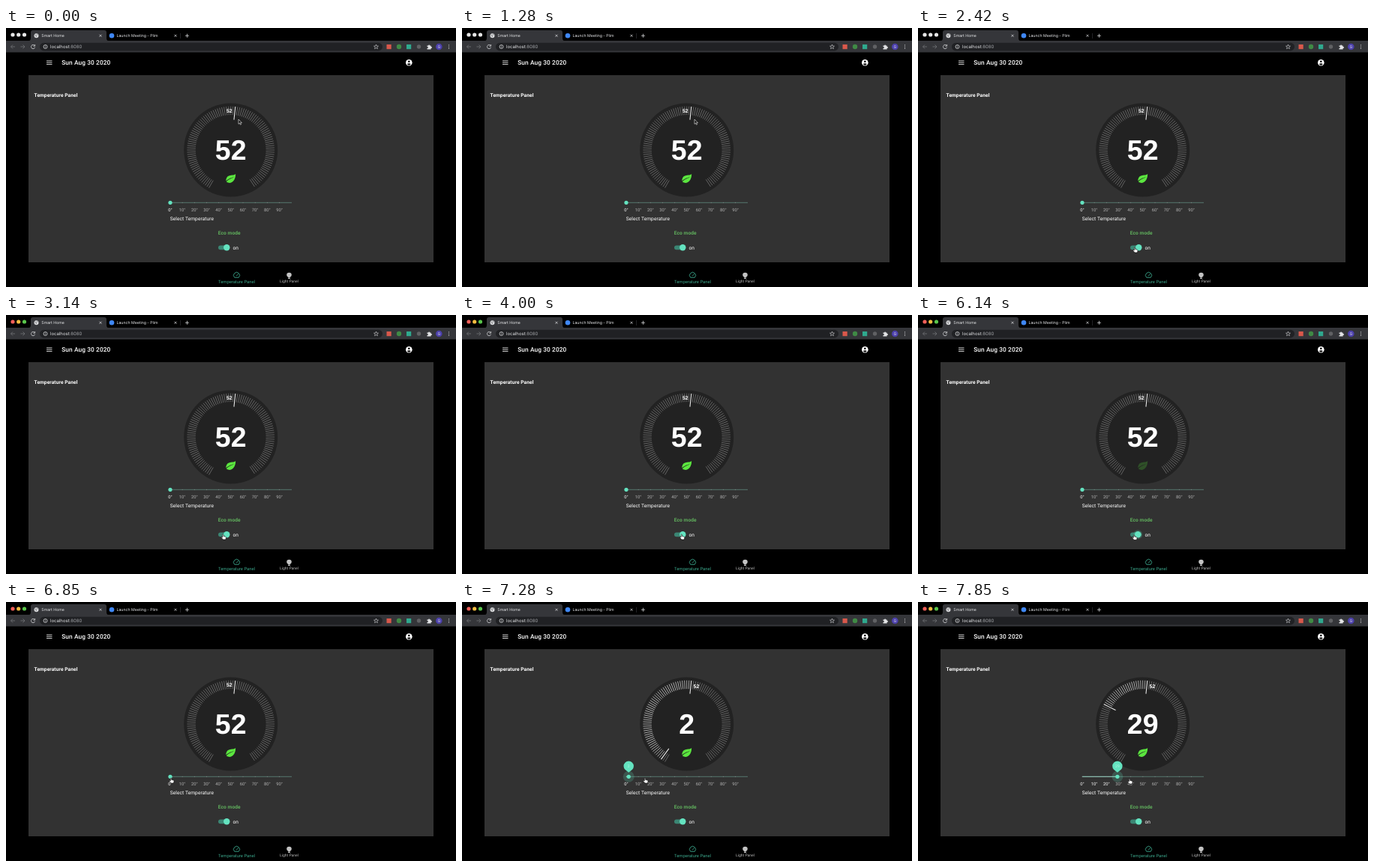
An HTML page that plays this animation: 600 by 346 pixels, repeating every 8000 ms.

```html
<!DOCTYPE html>
<html lang="en">
<head>
<meta charset="utf-8">
<title>Smart Home</title>
<style>
html, body { margin: 0; width: 100%; height: 100%; overflow: hidden; background: #000; }
svg { display: block; width: 100vw; height: 100vh; }
text { font-family: Roboto, sans-serif; fill: #fff; text-rendering: geometricPrecision; }
.ui { font-family: Inter, sans-serif; fill: #e8e9eb; }
.dial { font-family: "Liberation Sans", Arial, sans-serif; font-weight: 700; }
.line { fill: none; stroke: #d5d6d8; stroke-width: .8; }
.wide { letter-spacing: .06px; font-size: 6.67px; }
</style>
</head>
<body>
<svg id="stage" viewBox="0 0 600 346">
  <!-- browser window -->
  <path d="M29 17.5q4 0 4-4V6q0-3 3-3h95q3 0 3 3v7.500q0 4 4 4z" fill="#35363a"/>
  <rect y="17" width="600" height="15.500" fill="#35363a"/>
  <g id="lights"><circle cx="9" cy="9" r="2.600"/><circle cx="16.700" cy="9" r="2.600"/><circle cx="24.500" cy="9" r="2.600"/></g>
  <circle cx="40.500" cy="10.300" r="3" fill="#d9dadc"/>
  <path d="M38.500 9l2 1-.5 2M41 8l1.500 1.500" stroke="#55565a" stroke-width=".7" fill="none"/>
  <text class="ui" x="47.300" y="12.200" font-size="5.200">Smart Home</text>
  <circle cx="141" cy="10.300" r="3.300" fill="#3f87f5"/>
  <text class="ui" x="147.500" y="12.200" font-size="5.200">Launch Meeting - Plim</text>
  <path class="line" d="M124.500 8.800l3 3m0-3l-3 3M224.500 8.800l3 3m0-3l-3 3M239 10.300h5m-2.500-2.500v5"/>
  <path d="M232.500 7v7" stroke="#44454a" stroke-width=".5"/>
  <rect x="45" y="19.800" width="457" height="10.600" rx="5.300" fill="#202124"/>
  <path class="line" d="M38 23.300a2.600 2.600 0 1 0 .6 2.500M38.600 22v2.200h-2.200"/>
  <path class="line" style="stroke:#737478" d="M12 25H6.500m2.500-2.500L6.500 25 9 27.500M19.500 25H25m-2.500-2.500L25 25l-2.500 2.500"/>
  <circle class="line" cx="52.500" cy="25" r="2.500" stroke-width=".6"/>
  <path class="line" d="M52.500 24.700v1.700m0-3.100v.7"/>
  <text class="ui" x="59" y="27.100" font-size="6">localhost<tspan fill="#a5a7ab">:8080</tspan></text>
  <path class="line" style="stroke-width:.6" d="M493.500 22l.8 2.100 2.200.1-1.700 1.400.6 2.200-1.900-1.200-1.900 1.200.6-2.200-1.700-1.400 2.200-.1z"/>
  <rect x="507.500" y="22" width="6.200" height="6.200" fill="#d9584b"/>
  <circle cx="524" cy="25" r="3.200" fill="#3f8a45"/>
  <rect x="534" y="22" width="6.200" height="6.200" fill="#2fa98e"/>
  <circle cx="550.500" cy="25" r="2.700" fill="#606164"/>
  <path d="M561.500 23.500h1.600a1 1 0 1 1 2 0h1.500v1.600a1 1 0 1 1 0 1.900v1.400h-5.100v-1.500a1 1 0 1 0 0-1.900z" fill="#e2e3e5"/>
  <circle cx="577.300" cy="25" r="4.300" fill="#4d41ad"/>
  <text class="ui" x="577.300" y="26.900" font-size="5" text-anchor="middle">G</text>
  <path d="M590.500 22.800v.01m0 2.200v.01m0 2.200v.01" stroke="#d5d6d8" stroke-width="1.200" stroke-linecap="round"/>

  <!-- app bar -->
  <path d="M54 43.900h7.500M54 46.200h7.500M54 48.500h7.500" stroke="#fff" stroke-width=".8"/>
  <text x="74.200" y="49.200" font-size="8.330" font-weight="500" letter-spacing=".1">Sun Aug 30 2020</text>
  <circle cx="537.300" cy="46.200" r="4.300" fill="#fff"/>
  <circle cx="537.300" cy="44.700" r="1.300"/>
  <path d="M534.700 48.300q2.600-2.200 5.200 0-2.600 2.700-5.200 0z"/>

  <!-- panel -->
  <rect x="30" y="63" width="540" height="250" fill="#323232"/>
  <text class="wide" x="37.500" y="91.500" font-weight="700">Temperature Panel</text>
  <circle cx="299.700" cy="163" r="62.500" fill="#222"/>
  <g id="ticks" transform="translate(299.700 163)" stroke="#fff"></g>
  <text id="ambient" class="dial" font-size="6.900" text-anchor="middle">52</text>
  <text id="target" class="dial" x="299.700" y="176.300" font-size="37.500" text-anchor="middle"></text>
  <path id="leaf" transform="translate(293.300 194.600) scale(.128)" fill="#5be63f"
    d="M3 84c24 17 51 18 73-6C100 52 100 22 100 4 87 19 63 13 30 23 4 32 0 63 0 76c6-7 18-17 33-23 24-9 34-9 48-20-9 10-20 16-43 24C22 63 8 78 3 84z"/>

  <!-- slider -->
  <path d="M219 233.300h162" stroke="#5d8379" stroke-width=".85"/>
  <path id="fill" stroke="#a5dfcf" stroke-width=".85"/>
  <g id="labels"></g>
  <g id="thumb" fill="#64e3c0">
    <g id="bubble">
      <circle r="7.500" opacity=".2"/>
      <path d="M0-5.500l-4.900-4a6.700 6.700 0 1 1 9.800 0z"/>
      <text id="bubbleValue" y="-12.500" font-size="5" text-anchor="middle" style="fill:#b5f3e1"></text>
    </g>
    <circle r="2.600"/>
  </g>
  <text class="wide" x="218.700" y="256.700">Select Temperature</text>

  <!-- eco switch -->
  <text class="wide" x="282.800" y="275.700" font-weight="700" style="fill:#5fae5c">Eco mode</text>
  <rect id="track" x="283" y="290.400" width="15" height="5.800" rx="2.900"/>
  <circle id="halo" cy="293.300" r="6" fill="#64e3c0"/>
  <circle id="knob" cy="293.300" r="4.200"/>
  <text id="state" class="wide" x="302.500" y="295.500"></text>

  <!-- bottom navigation -->
  <path d="M304.700 333.300a4 4 0 1 1 5.600 0zM307 331.400l2.500-2.800" fill="none" stroke="#3aa489" stroke-width=".9"/>
  <text x="307.500" y="340.500" font-size="5.830" text-anchor="middle" style="fill:#3aa489">Temperature Panel</text>
  <path d="M376 332.700q-1.800-1-1.800-2.700a3.300 3.300 0 0 1 6.600 0q0 1.700-1.800 2.700v.8h-3zM376 334.100h3v1h-3z" fill="#c4c4c4"/>
  <text x="377.500" y="340.400" font-size="5" text-anchor="middle" style="fill:#b8b8b8">Light Panel</text>

  <!-- pointers -->
  <path id="arrow" d="M0 0v6.300l1.500-1.300 1 2.200 1-.4-1-2.200h2z" fill="#111" stroke="#eee" stroke-width=".6"/>
  <path id="hand" d="M-.7.5Q0-.6.7.5V2.500l2.500.6q1 .3.8 1.500L3.500 7H0L-2.300 4.300q-.1-1 .9-.8l.7.6z" fill="#fff" stroke="#000" stroke-width=".6"/>
</svg>
<script>
const LOOP = 8000, STEP = LOOP / 56, AMBIENT = 52, TICKS = 100;
const $ = id => document.getElementById(id);
const set = (node, attrs) => { for (const k in attrs) node.setAttribute(k, attrs[k]); };
const add = (parent, tag, attrs, text = "") => {
  const node = document.createElementNS("http://www.w3.org/2000/svg", tag);
  set(node, attrs);
  node.textContent = text;
  return parent.appendChild(node);
};
const clamp = x => Math.max(0, Math.min(1, x));
const easeOut = x => 1 - (1 - clamp(x)) ** 3;
const smooth = x => x * x * (3 - 2 * x);
const sliderX = value => 219 + 1.617 * value;
const dialAngle = value => value * 3 - 150;

// Rows are [time, ...values].
const POINTER = [[1430, 310, 122], [2290, 289, 293], [3000, 289, 293], [3700, 293, 293],
  [4700, 292, 293], [5200, 289, 293.5], [6280, 288, 293.5], [6860, 220, 235],
  [7000, 222, 235], [7280, 244, 235]];
const DRAG = [[7000, 0], [7286, 2], [7429, 10], [7857, 29]];
const FOCUS = 2850, SWITCH_OFF = 4850, SWITCH_ON = 6000, PRESS = 7000;

function sample(rows, t, ease = x => x) {
  const i = rows.findIndex(row => row[0] > t);
  if (i < 0) return rows[rows.length - 1].slice(1);
  if (i === 0) return rows[0].slice(1);
  const [from, to] = [rows[i - 1], rows[i]];
  const k = ease((t - from[0]) / (to[0] - from[0]));
  return from.slice(1).map((v, j) => v + (to[j + 1] - v) * k);
}

const ticks = Array.from({ length: TICKS }, (_, i) =>
  add($("ticks"), "line", { y1: -58.3, transform: `rotate(${dialAngle(i)})` }));
const labels = Array.from({ length: 10 }, (_, i) => {
  add($("labels"), "rect", { x: sliderX(i * 10) - .4, y: 232.9, width: .8, height: .8, fill: "#999" });
  return add($("labels"), "text", { x: sliderX(i * 10), y: 244.6, "font-size": 5.83, "text-anchor": "middle" }, `${i * 10}°`);
});

function drawDial(target) {
  const low = Math.min(target, AMBIENT), high = Math.max(target, AMBIENT);
  ticks.forEach((tick, i) => {
    const end = i === low || i === high;
    set(tick, {
      y2: end ? -40.6 : -46.9,
      "stroke-width": end ? 1 : .7,
      opacity: end ? .95 : i > low && i < high ? .8 : .38
    });
  });
  const angle = (dialAngle(AMBIENT) + (AMBIENT > target ? 8 : -8)) * Math.PI / 180;
  set($("ambient"), { x: 299.7 + 52.5 * Math.sin(angle), y: 165.5 - 52.5 * Math.cos(angle) });
  $("target").textContent = target;
}

function drawSlider(value, pressed) {
  const x = sliderX(value);
  set($("fill"), { d: `M219 233.300H${x}` });
  set($("thumb"), { transform: `translate(${x} 233.300)` });
  set($("bubble"), { visibility: pressed ? "visible" : "hidden" });
  $("bubbleValue").textContent = value;
  labels.forEach((label, i) => { label.style.fill = i * 10 <= value ? "#fff" : "#b0b0b0"; });
}

function drawSwitch(t) {
  const on = t < SWITCH_OFF || t >= SWITCH_ON;
  const slide = t < SWITCH_ON ? 1 - easeOut((t - SWITCH_OFF) / 300) : easeOut((t - SWITCH_ON) / 300);
  const x = 286.7 + 7.6 * slide;
  set($("track"), { fill: on ? "#3b8674" : "#707070" });
  set($("knob"), { cx: x, fill: on ? "#64e3c0" : "#bdbdbd" });
  const sinceClick = t - (t < SWITCH_ON ? SWITCH_OFF : SWITCH_ON);
  set($("halo"), { cx: x, opacity: sinceClick >= 0 ? .3 * clamp(1 - sinceClick / 600) : 0 });
  $("state").textContent = on ? "on" : "off";
  const leaf = t < SWITCH_ON ? 1 - clamp((t - SWITCH_OFF) / 500) : clamp((t - SWITCH_ON) / 600);
  set($("leaf"), { opacity: leaf });
}

function drawPointer(t) {
  const [x, y] = t < 7286 ? sample(POINTER, t, smooth) : sample([[7286, 244, 235], [7857, 282, 236]], t);
  const hand = t >= 2270 && t < 6420 || t >= 6780;
  for (const id of ["arrow", "hand"]) {
    set($(id), {
      transform: `translate(${x} ${y})`,
      visibility: (id === "hand") === hand ? "visible" : "hidden"
    });
  }
}

function draw(now) {
  const clock = Math.floor(now % LOOP / 10) * 10 + 9.99;
  const t = Math.floor(clock / STEP) * STEP;
  const value = Math.round(sample(DRAG, t)[0]);
  drawDial(value || AMBIENT);
  drawSlider(value, t >= PRESS);
  drawSwitch(t);
  drawPointer(t);
  const colors = t < FOCUS ? ["#e6e6e6", "#e6e6e6", "#e6e6e6"] : ["#f4605a", "#f6be40", "#5ac74c"];
  [...$("lights").children].forEach((light, i) => set(light, { fill: colors[i] }));
}

let start;
function loop(now) {
  start ??= now;
  draw(now - start);
  requestAnimationFrame(loop);
}
draw(0);
requestAnimationFrame(loop);
</script>
</body>
</html>
```
